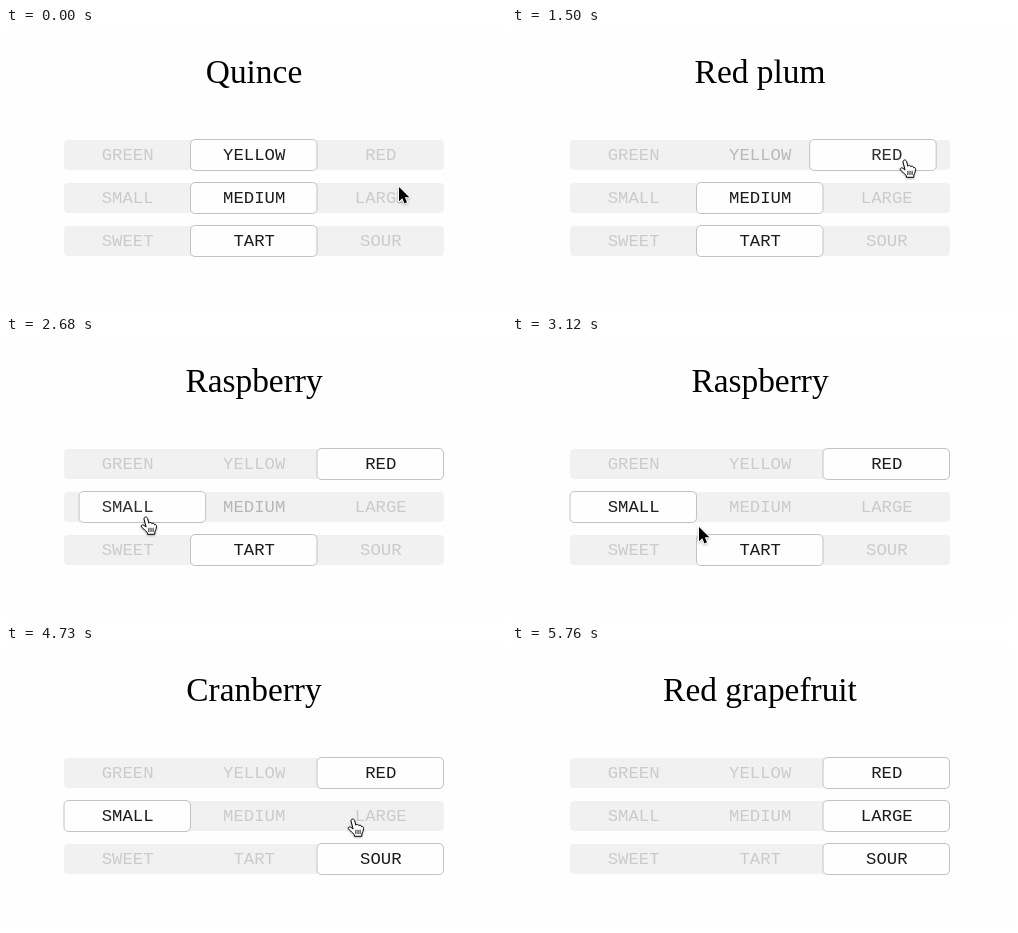
Recreate the animation shown at these times as an HTML page. Size 500x281 px, loop 6.05 s.

```html
<!DOCTYPE html>
<html lang="en">
<head>
<meta charset="utf-8">
<title>Fruit picker</title>
<style>
  html, body { margin: 0; width: 100%; height: 100%; overflow: hidden; background: #fefefe; }
  svg { display: block; width: 100vw; height: 100vh; }
  text { text-anchor: middle; }
  #title { font: 33.4px "Liberation Serif", "Times New Roman", serif; }
  .label { font: 17.3px "Liberation Mono", "Courier New", monospace; }
  .track { fill: #f1f1f1; }
  .thumb { fill: #fefefe; stroke: #c2c2c2; }
  #cursor { filter: drop-shadow(0 1px 1px #0004); }
  #arrow { stroke: #fff; paint-order: stroke; stroke-width: 2; stroke-linejoin: round; }
  #hand { fill: #fff; stroke: #000; stroke-linejoin: round; stroke-linecap: round; }
</style>
</head>
<body>
<svg viewBox="0 0 500 281">
  <text id="title" x="248" y="54.5"></text>
  <g id="rows"></g>
  <g id="cursor">
    <path id="arrow" d="M0 0V14.3L3.3 11.2 5.5 16.4 8 15.3 5.8 10.3H10.3Z"/>
    <g id="hand" transform="translate(-1 -1)">
      <path d="M-2 1.7C-2.2 -.4 1-.6 1.6 1.4L2.8 6.2C3.6 5 5.6 5.2 5.9 6.7 6.8 5.7 8.3 6.2 8.6 7.7
        9.6 7.1 10.7 8 10.5 9.4 10.3 12 9.6 13.5 8.8 15V17.3H1.4V15.6C-.6 13.9-2.4 12.2-4.5 9.9
        -5.5 8.4-3.6 7.2-2.1 8.3L-.2 9.8Z"/>
      <path d="M2.9 11.2V14.6M5 11.2V14.6M7.1 11.2V14.6" stroke-width=".9"/>
    </g>
  </g>
</svg>
<script>
const LOOP = 6050, SLIDE = 197;
const TOP = 112, PITCH = 43, HEIGHT = 30, CELL = 126.5;
const LABELS = [
  ['GREEN', 'YELLOW', 'RED'],
  ['SMALL', 'MEDIUM', 'LARGE'],
  ['SWEET', 'TART', 'SOUR'],
];
const CLICKS = [
  { at: 1390, row: 0, to: 2, title: 'Red plum' },
  { at: 2570, row: 1, to: 0, title: 'Raspberry' },
  { at: 4030, row: 2, to: 2, title: 'Cranberry' },
  { at: 5060, row: 1, to: 2, title: 'Red grapefruit' },
];
// Pointer path: time, x, y
const PATH = [
  [0, 393, 159], [450, 394, 133], [1640, 394, 133], [1940, 290, 163],
  [2229, 154, 183], [2530, 141, 181], [2820, 141, 181], [3111, 187, 190],
  [3410, 300, 236], [3700, 379, 216], [3840, 379, 215], [4290, 379, 215],
  [4580, 357, 185], [4725, 348, 174], [5330, 348, 174], [5620, 440, 262],
  [5750, 520, 330],
];

const $ = id => document.getElementById(id);
const lerp = (a, b, p) => a + (b - a) * p;
const easeOut = p => 1 - (1 - p) ** 3;

function add(name, attrs, text = '') {
  const el = document.createElementNS('http://www.w3.org/2000/svg', name);
  for (const key in attrs) el.setAttribute(key, attrs[key]);
  el.textContent = text;
  return $('rows').appendChild(el);
}

const rows = LABELS.map((words, i) => {
  const y = TOP + i * PITCH;
  add('rect', { class: 'track', x: 58, y, width: 380, height: HEIGHT, rx: 4 });
  return {
    thumb: add('rect', { class: 'thumb', y: y - .5, width: CELL, height: 31, rx: 4.5 }),
    labels: words.map((word, j) =>
      add('text', { class: 'label', x: 121.6 + j * 126.6, y: y + 20.3 }, word)),
  };
});

// The picture advances at about seven steps a second
const tick = t => t < 1494
  ? Math.floor(t / 150) * 150
  : 1494 + Math.floor((t - 1494) / 147) * 147;

function pointer(t) {
  const i = PATH.findIndex(key => key[0] > t);
  if (i < 0) return PATH[PATH.length - 1].slice(1);
  const [t0, x0, y0] = PATH[i - 1], [t1, x1, y1] = PATH[i];
  const p = (t - t0) / (t1 - t0);
  return [lerp(x0, x1, p), lerp(y0, y1, p)];
}

function drawRow({ thumb, labels }, { from, to, p }) {
  thumb.setAttribute('x', 58 + CELL * lerp(from, to, p));
  labels.forEach((label, j) => {
    const on = j === to ? p : j === from ? 1 - p : 0;
    const v = Math.round(lerp(203, 28, on));
    label.style.fill = `rgb(${v},${v},${v})`;
  });
}

function draw(t) {
  const state = rows.map(() => ({ from: 1, to: 1, p: 1 }));
  let title = 'Quince';
  for (const c of CLICKS) {
    if (t < c.at) break;
    title = c.title;
    const p = easeOut(Math.min(1, (t - c.at) / SLIDE));
    state[c.row] = { from: state[c.row].to, to: c.to, p };
  }
  $('title').textContent = title;
  rows.forEach((row, i) => drawRow(row, state[i]));

  const [x, y] = pointer(t);
  const over = t > 0 && x < 438 && y >= TOP && y < 229 && (y - TOP) % PITCH <= HEIGHT;
  $('cursor').setAttribute('transform', `translate(${Math.round(x)} ${Math.round(y)})`);
  $('hand').style.display = over ? '' : 'none';
  $('arrow').style.display = over ? 'none' : '';
}

const start = performance.now();
function frame() {
  draw(tick((performance.now() - start) % LOOP));
  requestAnimationFrame(frame);
}
frame();
</script>
</body>
</html>
```
